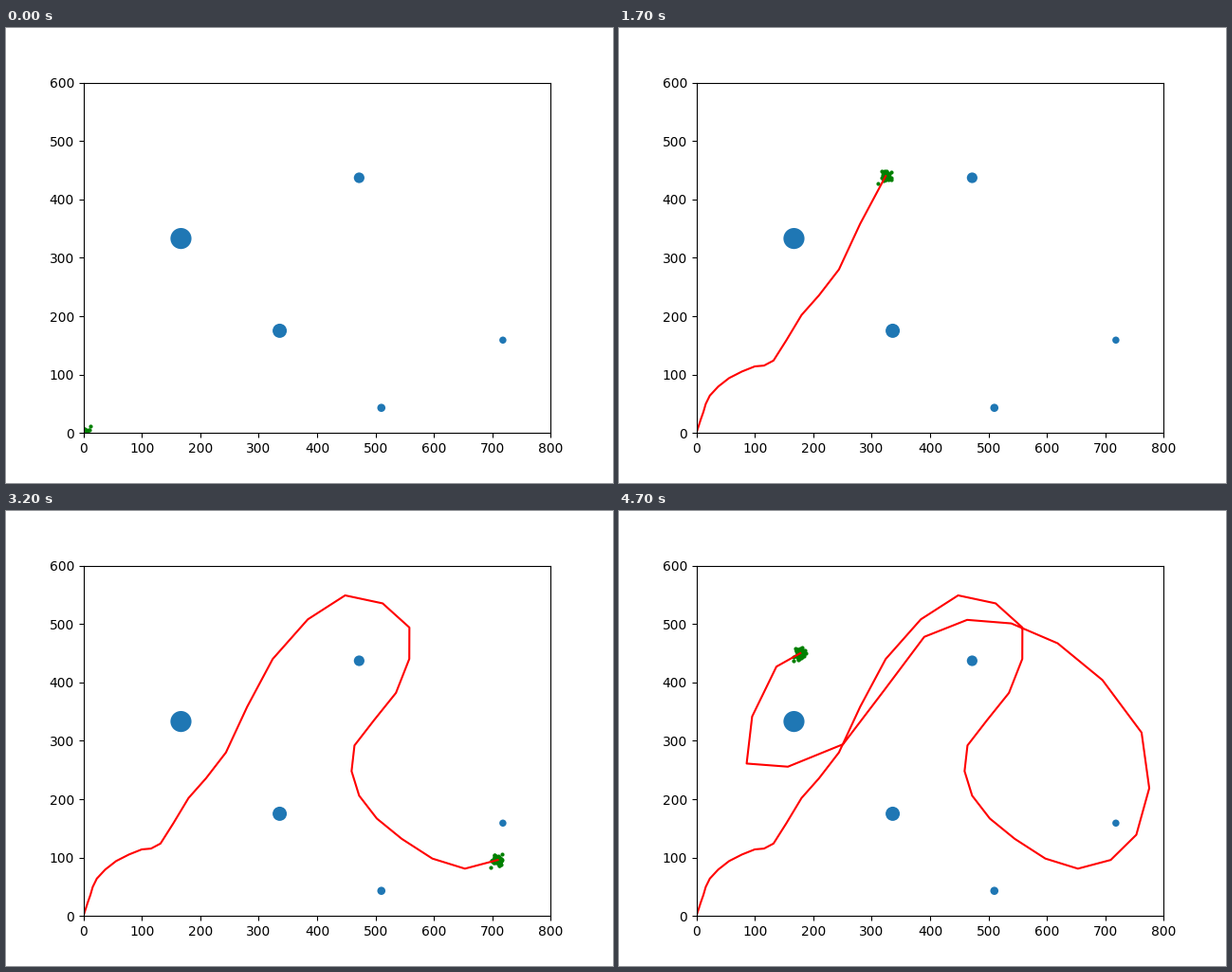
Write a matplotlib script that moves like this. It is 640 px wide and 480 px high and loops after 4.8 s.

```python
import numpy as np
import matplotlib.pyplot as plt
from matplotlib.animation import FuncAnimation

FRAMES, INTERVAL = 48, 100
PARTICLES, SPREAD, STRAY = 100, 3.9, 12.5

# landmarks: x, y, diameter in pixels
LANDMARKS = [(167, 333, 22.2), (336, 175, 15), (472, 437, 11.2),
             (510, 43, 8.6), (718, 159, 7.5)]

# key positions of the robot and the steps at which it passes them
KEY_STEPS = np.array([0, *range(3, 36, 2), *range(36, 47, 2), 47])
KEYS = np.array([
    (0, 0), (12, 36), (23, 64), (56, 94), (100, 114), (132, 124), (180, 202),
    (244, 280), (324, 440), (448, 549), (558, 494), (535, 382), (464, 292),
    (472, 206), (545, 132), (653, 81), (753, 139), (762, 314), (695, 404),
    (539, 501), (390, 478), (251, 294), (86, 261), (137, 427), (178, 450),
])


def spline(t, knots, points):
    """Cubic Hermite curve through the points, with estimated slopes."""
    slopes = np.gradient(points.astype(float), knots, axis=0)
    i = np.clip(np.searchsorted(knots, t, side="right") - 1, 0, len(knots) - 2)
    h = (knots[i + 1] - knots[i])[:, None]
    u = (t - knots[i])[:, None] / h
    rise = u * u * (3 - 2 * u)
    return (points[i] * (1 - rise) + points[i + 1] * rise
            + h * u * (1 - u) * (slopes[i] * (1 - u) - slopes[i + 1] * u))


def cloud(step):
    """Particles scattered around the robot; one strays, later lagging behind."""
    rng = np.random.default_rng(100 + step)
    offsets = rng.normal(0, SPREAD, (PARTICLES, 2))
    offsets[0] = STRAY if step < FRAMES / 4 else -STRAY
    return path[step] + offsets


path = spline(np.arange(FRAMES), KEY_STEPS, KEYS)

fig, ax = plt.subplots(figsize=(6.4, 4.8), dpi=100)
ax.set_aspect("equal")
ax.set_xlim(0, 800)
ax.set_ylim(0, 600)

x, y, size = np.transpose(LANDMARKS)
ax.scatter(x, y, s=(size * 72 / fig.dpi) ** 2, color="tab:blue", linewidths=0)
particles, = ax.plot([], [], "go", markersize=2)
trail, = ax.plot([], [], "r-", linewidth=1.5)


def update(step):
    particles.set_data(*cloud(step).T)
    trail.set_data(*path[:step + 1].T)
    return particles, trail


anim = FuncAnimation(fig, update, frames=FRAMES, interval=INTERVAL,
                     init_func=lambda: update(0), repeat=True, repeat_delay=0)
plt.show()
```
